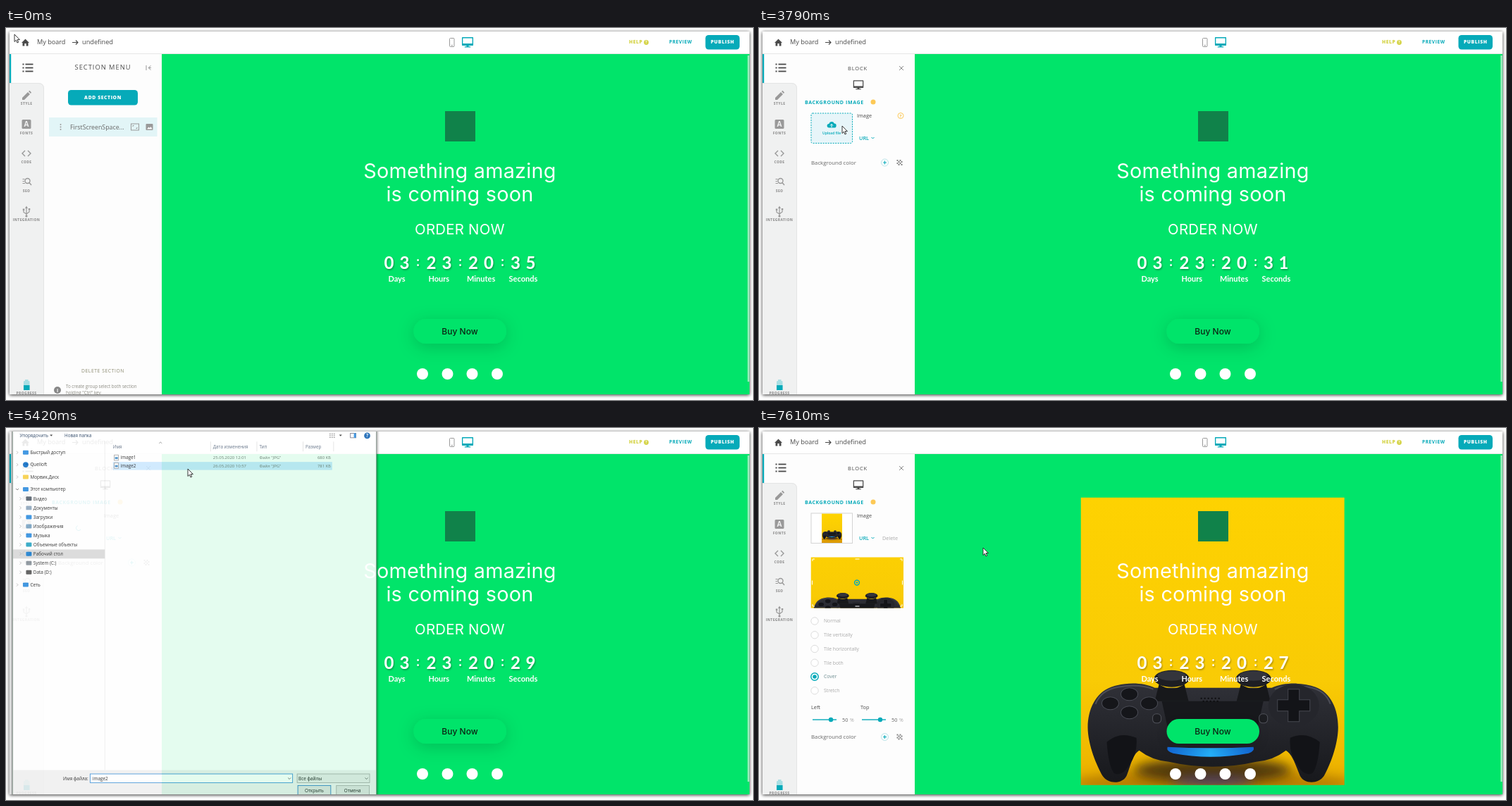
These frames come from a looping animation (1060x528 px, 8000 ms). An HTML page:

```html
<!DOCTYPE html>
<html lang="en">
<head>
<meta charset="utf-8">
<title>Page builder</title>
<style>
html, body { margin: 0; width: 100%; height: 100%; overflow: hidden; background: #fff; }
svg { display: block; }
#stage { width: 100vw; height: 100vh; font-family: "Open Sans", sans-serif; }
text { white-space: pre; }
.head { font-family: Inter, sans-serif; }
.lato { font-family: Lato, sans-serif; font-weight: 700; }
</style>
</head>
<body>
<script>
const TEAL = '#06aab9', GREEN = '#01e46a', GREY = '#999', DARK = '#4a4a4a';

// y is the optical middle of the capitals
const txt = (x, y, s, size, fill, attr = '') =>
  `<text x="${x}" y="${y + size * .36}" font-size="${size}" fill="${fill}" ${attr}>${s}</text>`;
const mid = (x, y, s, size, fill, attr = '') => txt(x, y, s, size, fill, `text-anchor="middle" ${attr}`);
const rect = (x, y, w, h, fill, attr = '') =>
  `<rect x="${x}" y="${y}" width="${w}" height="${h}" fill="${fill}" ${attr}/>`;
const dot = (x, y, r, fill, attr = '') => `<circle cx="${x}" cy="${y}" r="${r}" fill="${fill}" ${attr}/>`;
const oval = (x, y, rx, ry, fill, attr = '') => `<ellipse cx="${x}" cy="${y}" rx="${rx}" ry="${ry}" fill="${fill}" ${attr}/>`;
const line = (d, stroke, w = 1, attr = '') => `<path d="${d}" fill="none" stroke="${stroke}" stroke-width="${w}" ${attr}/>`;
const fill = (d, color, attr = '') => `<path d="${d}" fill="${color}" ${attr}/>`;
const group = (id, body, attr = '') => `<g id="${id}" ${attr}>${body}</g>`;
const bold = sp => `font-weight="800" letter-spacing="${sp}"`;

const monitor = (x, y, s, color) =>
  `<g transform="translate(${x} ${y}) scale(${s})">${line('M-7-6H7V4H-7Z', color, 1.3, 'stroke-linejoin="round"')}${fill('M-7 2H7V4H-7ZM-1.5 4H1.5V6H4V7.200H-4V6H-1.500Z', color)}</g>`;

const picture = (x, y, color) =>
  line(`M${x - 5} ${y - 4}h10v8h-10z`, color, 1.2) + fill(`M${x - 4} ${y + 3}l3-4 2 2 1.5-2 2.5 4z`, color);

// gradients, filters and the photo
function defs() {
  const stick = x =>
    fill(`M${x - 18} 364Q${x} 376 ${x + 18} 364L${x + 24} 388H${x - 24}Z`, '#17181b') +
    oval(x, 356, 25, 12, '#1d1e23') + oval(x, 352, 20, 7, '#34353c');
  const pad = [[526, 378], [499, 391], [554, 391], [526, 404]].map(p => oval(p[0], p[1], 12, 9, '#15161a', 'stroke="#484a53"')).join('');
  const photo =
    rect(457, 32, 374, 542, 'url(#sun)') +
    oval(644, 505, 200, 20, '#8a5500', 'opacity=".5" filter="url(#soft)"') +
    oval(644, 486, 112, 18, '#33230f', 'opacity=".8" filter="url(#soft)"') +
    oval(644, 502, 60, 8, '#3a3aa8', 'opacity=".6" filter="url(#soft)"') +
    fill('M467 425C467 400 478 376 500 368C520 361 545 361 562 369H728C745 361 772 361 790 368C812 376 822 400 822 425C822 450 810 480 802 494C794 506 774 506 768 494C762 480 758 464 748 458Q730 472 706 474Q644 488 582 474Q558 472 540 458C530 464 528 480 522 494C516 506 496 506 488 494C480 480 467 450 467 425Z', 'url(#shell)') +
    line('M478 392Q486 372 510 368Q540 363 560 371M732 371Q750 363 780 368Q804 372 811 392', '#5a5c66', 2, 'opacity=".7"') +
    fill('M572 388H716L708 424H580Z', '#17181c') +
    fill('M494 446Q512 430 536 440Q538 462 526 478Q516 496 504 490Q496 478 494 446ZM796 446Q776 430 754 440Q752 462 764 478Q774 496 786 490Q794 478 796 446Z', '#121317') +
    stick(586) + stick(702) + pad +
    oval(759, 394, 36, 30, '#25262c') + fill('M751 371h16v15h15v16h-15v15h-16v-15h-15v-16h15z', '#131418', 'stroke="#45474f"') +
    line('M627 384h30M630 388h24', '#0c0c0e', 2, 'stroke-dasharray="2 3"') +
    rect(559, 406, 12, 13, '#1c1d21', 'rx="5" stroke="#50525a"') + rect(710, 406, 12, 13, '#1c1d21', 'rx="5" stroke="#50525a"') +
    fill('M580 453Q641 456 702 453Q704 459 695 462Q641 472 588 462Q578 459 580 453Z', 'url(#glow)');
  return `<defs>
    <linearGradient id="sun" x2="0" y2="1"><stop stop-color="#ffd400"/><stop offset=".6" stop-color="#f9cb05"/><stop offset=".8" stop-color="#f0b800"/><stop offset="1" stop-color="#d99400"/></linearGradient>
    <linearGradient id="shell" x2="0" y2="1"><stop stop-color="#303138"/><stop offset="1" stop-color="#17181c"/></linearGradient>
    <linearGradient id="glow"><stop stop-color="#1267d8"/><stop offset=".5" stop-color="#25b4ff"/><stop offset="1" stop-color="#1267d8"/></linearGradient>
    <filter id="soft" x="-30%" y="-100%" width="160%" height="300%"><feGaussianBlur stdDeviation="8"/></filter>
    <filter id="frame"><feDropShadow dx="0" dy="1" stdDeviation="2.4" flood-opacity=".8"/></filter>
    <filter id="lift" x="-40%" y="-100%" width="180%" height="340%"><feDropShadow dx="0" dy="5" stdDeviation="12" flood-opacity=".17"/></filter>
    <filter id="drop"><feDropShadow dx="1" dy="1.5" stdDeviation=".8" flood-opacity=".35"/></filter>
    <clipPath id="win">${rect(5, 5, 1050, 515, '#000')}</clipPath>
    <clipPath id="load"><rect id="loaded" x="457" y="32" width="374" height="542"/></clipPath>
    <g id="photo" clip-path="url(#load)">${photo}</g>
  </defs>`;
}
const photoAt = (x, y, w, h) =>
  `<svg x="${x}" y="${y}" width="${w}" height="${h}" viewBox="457 32 374 542" preserveAspectRatio="xMidYMid slice"><use href="#photo"/></svg>`;

function topBar() {
  return rect(5, 5, 1050, 32, '#fff') +
    fill('M22 21L27.500 15.500L33 21H31.500V25.500H28.700V22H26.300V25.500H23.500V21Z', DARK) +
    txt(44, 20, 'My board', 9.1, DARK) + line('M94 20.500H102M99 17.500L102 20.500L99 23.500', DARK, 1.1) +
    txt(108, 20, 'undefined', 9.2, DARK) +
    rect(629.500, 14.500, 6.500, 12, 'none', 'rx="1" stroke="#999"') + line('M631.500 24.700h2.500', GREY) +
    monitor(655, 20, 1.05, TEAL) +
    txt(884, 20, 'HELP', 6.8, '#d5d449', bold(.5)) + dot(908.500, 20.500, 3.4, '#d5d449') + mid(908.500, 20.500, '?', 5, '#fff', 'font-weight="700"') +
    txt(941, 20, 'PREVIEW', 6.6, TEAL, 'font-weight="700" letter-spacing=".55"') +
    rect(992.500, 10, 48.500, 20.500, TEAL, 'rx="4.500"') + mid(1016.800, 20, 'PUBLISH', 6.8, '#fff', bold(.6));
}

function sideBar() {
  const label = (y, s) => mid(29, y, s, 4.9, GREY, bold(.4));
  return fill('M5 78H46Q54 78 54 86V520H5Z', '#f0f1f1') + line('M5 78.500H46Q53.500 78.500 53.500 86V520', '#e4e4e4') +
    rect(5, 37, 2.2, 41, TEAL) +
    [51.5, 56.5, 61.5].map(y => rect(23.500, y - 1, 2, 2, DARK) + rect(27.500, y - .9, 11, 1.8, DARK)).join('') +
    fill('M23 102V99L31 91L34 94L26 102ZM32 90L33.500 88.800L36 91.500L35 93Z', GREY) + label(107, 'STYLE') +
    rect(22.500, 130, 13, 13, GREY, 'rx="1.500"') + mid(29, 136.500, 'A', 10, '#f0f0f0', 'font-weight="700"') + label(149, 'FONTS') +
    line('M27 174L23 178L27 182M31 174L35 178L31 182', GREY, 1.4) + label(190, 'CODE') +
    line('M26.500 214.500H23.500M26 217.500H23.500M27 220.500H23.500', GREY, 1.1) + dot(30.500, 217, 3.5, 'none', `stroke="${GREY}" stroke-width="1.400"`) + line('M33 219.500L36 223', GREY, 1.4) + label(231, 'SEO') +
    line('M29 255V267M25 259V261.500L29 264L33 261V258.500', GREY, 1.2) + fill('M29 252.500L31 256H27ZM23.800 256.500h2.500v2.500h-2.500zM31.800 256h2.500v2.500h-2.500z', GREY) + dot(29, 267, 1.6, GREY) + label(272, 'INTEGRATION') +
    rect(27, 499, 4.500, 3, '#a8dfe4') + rect(25, 501, 8.500, 13, '#a8dfe4', 'rx="1"') + rect(25, 507, 8.500, 7, TEAL) + label(518, 'PROGRESS');
}

function sectionMenu() {
  return mid(137.500, 56, 'SECTION MENU', 9.3, DARK, 'letter-spacing="1"') +
    line('M199 53V60M205.500 53.500L202 56.500L205.500 59.500M202 56.500H206', GREY) +
    rect(88, 88, 99, 21.500, TEAL, 'rx="4.500"') + mid(137.500, 98.700, 'ADD SECTION', 6.8, '#fff', bold(.6)) +
    rect(61, 127, 153.500, 27, '#e2f5f7') +
    [137, 140.5, 144].map(y => dot(77.500, y, 1, GREY)).join('') +
    txt(91, 140.500, 'FirstScreenSpace...', 8.8, '#666') +
    rect(177.500, 136, 11, 9, 'none', 'stroke="#999"') + line('M180 140V138.500H181.500M186 141V142.500H184.500', GREY) +
    rect(198.500, 136, 10, 9, GREY, 'rx="1"') + fill('M200 143.500l2.500-3 1.500 1.500 1.500-2 2 3.500z', '#fff') +
    mid(137.500, 487, 'DELETE SECTION', 6.8, '#8b8a70', 'letter-spacing=".55"') +
    dot(73, 514, 5, '#888') + mid(73, 514, 'i', 7, '#fff', 'font-weight="700"') +
    txt(85, 509, 'To create group select both section', 6.2, '#8b8a80') +
    txt(85, 518, 'holding "Ctrl" key', 6.2, '#8b8a80');
}

function blockPanel() {
  const modes = ['Normal', 'Tile vertically', 'Tile horizontally', 'Tile both', 'Cover', 'Stretch'];
  const radios = modes.map((m, i) => {
    const y = 274 + i * 19.75, on = m === 'Cover';
    return dot(79, y, 5.2, '#fff', `stroke="${on ? TEAL : '#ddd'}" stroke-width="${on ? 1.5 : 1}"`) +
      (on ? dot(79, y, 2.8, TEAL) : '') + txt(92, y, m, 6.8, on ? '#6d8c90' : '#aaa');
  }).join('');
  const slider = (x, name) => txt(x - 2, 396, name, 7.3, DARK) + rect(x, 413.300, 34, 1.400, TEAL) +
    dot(x + 26, 414, 3.2, TEAL) + txt(x + 42, 414, '50', 7.3, '#666') + txt(x + 53, 414, '%', 7, '#aaa');
  const checks = [-3, -1, 1, 3].map((a, i) => [-3, -1, 1, 3].map((b, j) => (i + j) % 2 ? '' : rect(199.500 + a - 1, 191 + b - 1, 2, 2, '#888')).join('')).join('');
  return mid(140, 57, 'BLOCK', 7.5, DARK, 'letter-spacing=".8"') + line('M199 54L205 60M205 54L199 60', '#888') +
    monitor(141, 80.500, .95, DARK) +
    txt(65, 105, 'BACKGROUND IMAGE', 7, TEAL, 'font-weight="700" letter-spacing=".6"') + dot(162, 105, 3.5, '#fdc956') +
    txt(139, 124.500, 'Image', 7.3, DARK) + txt(142, 156, 'URL', 7.3, TEAL, 'font-weight="600"') + line('M159.500 155L161.500 157L163.500 155', TEAL) +
    group('upload',
      rect(74, 121, 58.500, 42.500, '#e7f5f9', `rx="2" stroke="${TEAL}" stroke-dasharray="2 1.500"`) +
      fill('M99.500 141.500a2.800 2.800 0 0 1-.2-5.600a4 4 0 0 1 7.500-.4a3 3 0 0 1-.3 6Z', TEAL) + line('M103 141V136.500M101 138.500L103 136.500L105 138.500', '#fff') +
      mid(103, 149.500, 'Upload file', 5, TEAL, 'font-weight="600"') +
      dot(201, 124.500, 4, 'none', 'stroke="#fdc956"') + mid(201, 124.500, '?', 6, '#f5b92e', 'font-weight="700"')) +
    group('spin', line('M103 138.500a3.500 3.500 0 1 1-2.500 6', TEAL, .9)) +
    group('thumb', rect(74, 121, 58.500, 42.500, '#fff', 'stroke="#d4d4d4"') + photoAt(89, 121.500, 29, 41.500)) +
    group('options',
      txt(175, 156, 'Delete', 7.3, '#aaa') +
      group('preview', photoAt(73.500, 183.500, 131.500, 72)) +
      line('M76 189V186H79M200 186H203V189M76 250V253H79M200 253H203V250M136.500 186H142.500M136.500 253H142.500M75.500 216.500V222.500M203.500 216.500V222.500', '#fff', 1) +
      dot(139, 219.500, 3.4, '#f9cb05', `stroke="${TEAL}" stroke-width="1.500"`) + dot(139, 219.500, 1.2, TEAL) +
      radios + slider(76, 'Left') + slider(146, 'Top')) +
    group('color', txt(74, 191, 'Background color', 7.8, '#666') + dot(178.500, 191, 5, '#fff', 'stroke="#b9e3e7"') +
      line('M176 191H181M178.500 188.500V193.500', TEAL) + checks);
}

function canvas() {
  const digit = (x, id, s) => mid(x, 333.300, s, 24, '#fff', `id="${id}" filter="url(#drop)"`);
  const fixed = [[543.500, '0'], [565.500, '3'], [603.500, '2'], [625.500, '3'], [663, '2'], [685, '0']];
  const head = (y, s, size) => mid(644, y, s, size, '#fff', 'class="head" letter-spacing=".25"');
  return rect(221, 37, 834, 483, GREEN) + rect(1052.500, 39, 2, 463, '#bfeccf') +
    group('image', photoAt(456.500, 98.700, 374.300, 408)) +
    group('hover',
      rect(456, 98, 376.500, 409.500, 'rgba(24,115,209,.3)', 'stroke="#176fc6" stroke-width="1.500"') +
      rect(456, 97.500, 88, 20.500, '#1370c8') +
      dot(472, 107.800, 3, 'none', 'stroke="#fff" stroke-width="2"') + dot(472, 107.800, 4.6, 'none', 'stroke="#fff" stroke-width="1.300" stroke-dasharray="1.800"') +
      dot(500.500, 107.800, 9.5, '#5d9fdb') + picture(500.500, 107.800, '#fff') +
      line('M524.500 107.800H533.500M529 103.300V112.300', '#fff', 1.5)) +
    rect(623, 118, 43, 43, '#10824a') +
    head(203, 'Something amazing', 28.8) + head(236, 'is coming soon', 28.8) + head(286, 'ORDER NOW', 20.4) +
    `<g class="lato">${fixed.map(f => digit(f[0], '', f[1])).join('')}${digit(723, 'tens', '3')}${digit(744.500, 'ones', '5')}
      ${[584.5, 644.5, 704.5].map(x => mid(x, 331.500, ':', 18, '#fff', 'filter="url(#drop)"')).join('')}
      ${['Days', 'Hours', 'Minutes', 'Seconds'].map((s, i) => mid(554.500 + i * 59.8, 356, s, 11, '#fff')).join('')}</g>` +
    rect(578.500, 413, 131.500, 35, GREEN, 'rx="17.500" filter="url(#lift)"') +
    mid(644, 430.300, 'Buy Now', 12, '#0b2413', 'class="head" font-weight="500"') +
    [591, 626.5, 661.5, 697].map(x => dot(x, 491, 8, '#fff')).join('');
}

function dialog() {
  const INK = '#222', SOFT = '#777', BLUE = '#2f8ee0';
  const chev = (x, y) => line(`M${x - 1} ${y - 2}l2 2l-2 2`, '#aaa', .8);
  const row = (x, y, s, color, round) => (round ? dot(x - 6.500, y, 3.8, color) : rect(x - 10.500, y - 3, 8, 6, color, 'rx="1"')) + txt(x, y, s, 6.4, INK);
  const roots = [[33.5, 'Быстрый доступ', BLUE], [51, 'Quelloft', '#1070c8', 1], [68.5, 'Морвик.Диск', '#f7cf46'], [86, 'Этот компьютер', BLUE]];
  const kids = [['Видео', '#55606c'], ['Документы', '#8fa7bd'], ['Загрузки', BLUE], ['Изображения', '#7fa9c9'], ['Музыка', BLUE],
    ['Объемные объекты', '#2aa5c4'], ['Рабочий стол', '#1b7fd0'], ['System (C:)', '#8a949c'], ['Data (D:)', '#555']];
  const file = (y, name, date, size) =>
    rect(153, y - 4, 6, 8, '#fff', 'stroke="#888" stroke-width=".7"') + rect(154, y - 1, 4, 3, '#4a90c8') +
    txt(162, y, name, 6.4, INK) + txt(294, y, date, 6, SOFT) + txt(360, y, 'Файл "JPG"', 6, SOFT) + txt(443, y, size, 6, SOFT);
  const heads = [[151, 'Имя'], [294, 'Дата изменения'], [360, 'Тип'], [426, 'Размер']].map(h => txt(h[0], 25, h[1], 6.3, '#5b6b80')).join('');
  const field = (x, y, w, h, stroke, bg = '#fff') => rect(x, y, w, h, bg, `stroke="${stroke}" stroke-width=".9"`);
  return rect(8, -30, 519, 580, '#fff', 'stroke="#8a9a90" filter="url(#frame)"') + rect(8.500, 487, 518, 60, '#f0f0f0') +
    line('M139.500 17V487', '#eee') + line('M290.500 18V32M356.500 18V32M422.500 18V32M466 18V32', '#e3e3e3') +
    line('M217 20.500l2-1.800l2 1.800', '#777', .8) + heads +
    rect(490, 6, 8, 6.500, '#fff', 'stroke="#667" stroke-width=".8"') + rect(495, 6, 3, 6.500, BLUE) +
    dot(514, 9.500, 4.4, '#1766b5') + mid(514, 9.500, '?', 6.5, '#fff', 'font-weight="700"') +
    group('bare', rect(8.500, 79.500, 131, 13, '#d9d9d9') + row(33, 103.500, 'Сеть', BLUE) +
      rect(80, 493, 36, 9, '#fff') + rect(118, 492, 290, 13, '#fff') + rect(414, 492, 104, 13, '#fafafa') + rect(414, 508, 49, 12, '#fafafa') + rect(469, 508, 49, 12, '#fafafa')) +
    group('full',
      txt(18, 9.300, 'Упорядочить', 6.3, '#1e395b') + fill('M61 8h4l-2 2.500z', '#333') + txt(82, 9.300, 'Новая папка', 6.3, '#1e395b') +
      line('M460 7h8M460 9.500h8M460 12h8', '#888', 1, 'stroke-dasharray="2 1"') + fill('M474 8h4l-2 2.500z', '#333') +
      rect(8.500, 172, 131, 13, '#d9d9d9') +
      roots.slice(0, 3).map(r => chev(14.500, r[0])).join('') + line('M12.500 85l2 2l2-2', '#555', .8) +
      kids.map((k, i) => chev(19, 99.500 + i * 13.13) + row(37.500, 99.500 + i * 13.13, k[0], k[1])).join('') +
      chev(14.500, 222.500) + row(33, 222.500, 'Сеть', BLUE) +
      rect(151, 47, 313, 11.500, '#e5f3fb', 'id="pick"') +
      txt(80, 499, 'Имя файла:', 6.4, INK) + field(118.500, 492.500, 289, 12.500, '#3b8fd6') + line('M401 498l2 2l2-2', '#555', .8) +
      txt(122, 499, '', 6.4, INK, 'id="name"') +
      field(414, 492.500, 103.500, 12.500, '#aaa', '#e9e9e9') + txt(416, 499, 'Все файлы', 6.4, INK) + line('M511 498l2 2l2-2', '#555', .8) +
      field(415, 509, 47, 14, '#2f7fc4', '#e1e1e1') + mid(438.500, 516, 'Открыть', 6.4, INK) +
      field(470, 509, 47, 14, '#adadad', '#e1e1e1') + mid(493, 516, 'Отмена', 6.4, INK)) +
    roots.map(r => row(33, r[0], r[1], r[2], r[3])).join('') +
    file(41, 'image1', '25.05.2020 12:01', '680 КБ') + file(52.500, 'image2', '26.05.2020 10:57', '781 КБ');
}

const pointer =
  group('arrow', fill('M0 0V10.500L2.400 8.200L4 12L5.700 11.200L4.100 7.600H7.400Z', '#fff', 'stroke="#222" stroke-width=".9" stroke-linejoin="round"')) +
  group('hand', fill('M-1.300 1Q0-.8 1.300 1V5L5 5.800Q6.500 6.300 6.200 8L5.300 12.500H-.5L-3.500 8Q-3.500 6.500-1.300 7.500Z', '#fff', 'stroke="#222" stroke-width=".9"')) +
  group('busy', dot(8.500, 1.500, 3.2, 'none', `stroke="${TEAL}" stroke-width="1.500"`));

document.body.insertAdjacentHTML('afterbegin',
  `<svg id="stage" viewBox="0 0 1060 528" preserveAspectRatio="none">${defs()}
  ${rect(5, 5, 1050, 515, '#fdfdfd', 'filter="url(#frame)"')}
  <g clip-path="url(#win)">${topBar()}${line('M5 36.500H1055', '#e6e6e6')}${sideBar()}${group('menu', sectionMenu())}${group('block', blockPanel())}${canvas()}${group('dialog', dialog())}</g>
  ${group('cursor', pointer)}</svg>`);

const $ = id => document.getElementById(id);
const show = (id, on) => $(id).setAttribute('opacity', +on);
const set = (id, name, v) => $(id).setAttribute(name, v);
const ramp = (t, a, b) => Math.min(1, Math.max(0, (t - a) / (b - a)));

const path = [[0, 12, 9], [650, 12, 9], [1110, 256, 137], [1580, 256, 137], [2370, 504, 106], [3090, 504, 106],
  [3790, 118, 139], [4400, 118, 139], [4860, 258, 58], [5800, 258, 58], [6170, 318, 170], [8000, 318, 170]];
const ticks = [120, 1110, 2120, 3120, 4120, 5120, 6110, 7140];

function cursorAt(t) {
  const i = path.findIndex(p => p[0] > t), a = path[i - 1], b = path[i];
  const p = ramp(t, a[0], b[0]), e = p * p * (3 - 2 * p);
  return [a[1] + (b[1] - a[1]) * e, a[2] + (b[2] - a[2]) * e];
}

function update(t) {
  const [x, y] = cursorAt(t);
  set('cursor', 'transform', `translate(${x} ${y})`);
  const hand = t >= 2330 && t < 3130;
  show('hand', hand);
  show('arrow', !hand);
  show('busy', t >= 3930 && t < 4080);

  const left = String(35 - ticks.filter(k => t >= k).length);
  $('tens').textContent = left[0];
  $('ones').textContent = left[1];

  show('hover', ramp(t, 2030, 2250) - ramp(t, 3180, 3400));
  const block = ramp(t, 2400, 2500);
  show('menu', 1 - block);
  show('block', block);

  // upload, wait, then the options
  const ready = t >= 6610, loaded = t >= 7140;
  show('upload', t < 5400);
  show('spin', t >= 5400 && !ready);
  set('spin', 'transform', `rotate(${(t - 5960) * .45} 103 142)`);
  show('options', t < 6610 ? 0 : t < 6660 ? .5 : 1);
  set('color', 'transform', `translate(0 ${ready ? 247.5 : 0})`);
  ['image', 'thumb', 'preview'].forEach(id => show(id, loaded));
  set('loaded', 'height', t < 7610 ? 270 : 542);

  // file dialog
  const open = ramp(t, 4080, 4325) - ramp(t, 5400, 5600), s = .943 + .057 * open;
  show('dialog', open);
  set('dialog', 'transform', `translate(267.500 240) scale(${s}) translate(-267.500 -240)`);
  show('bare', t < 4400);
  show('full', t >= 4400);
  set('pick', 'fill', t < 4700 ? 'none' : t < 5080 ? '#e5f3fb' : '#cce8ff');
  $('name').textContent = t >= 5080 ? 'image2' : '';
}

const start = performance.now();
function frame(now) {
  update(Math.max(0, now - start) % 8000);
  requestAnimationFrame(frame);
}
update(0);
requestAnimationFrame(frame);
</script>
</body>
</html>
```
